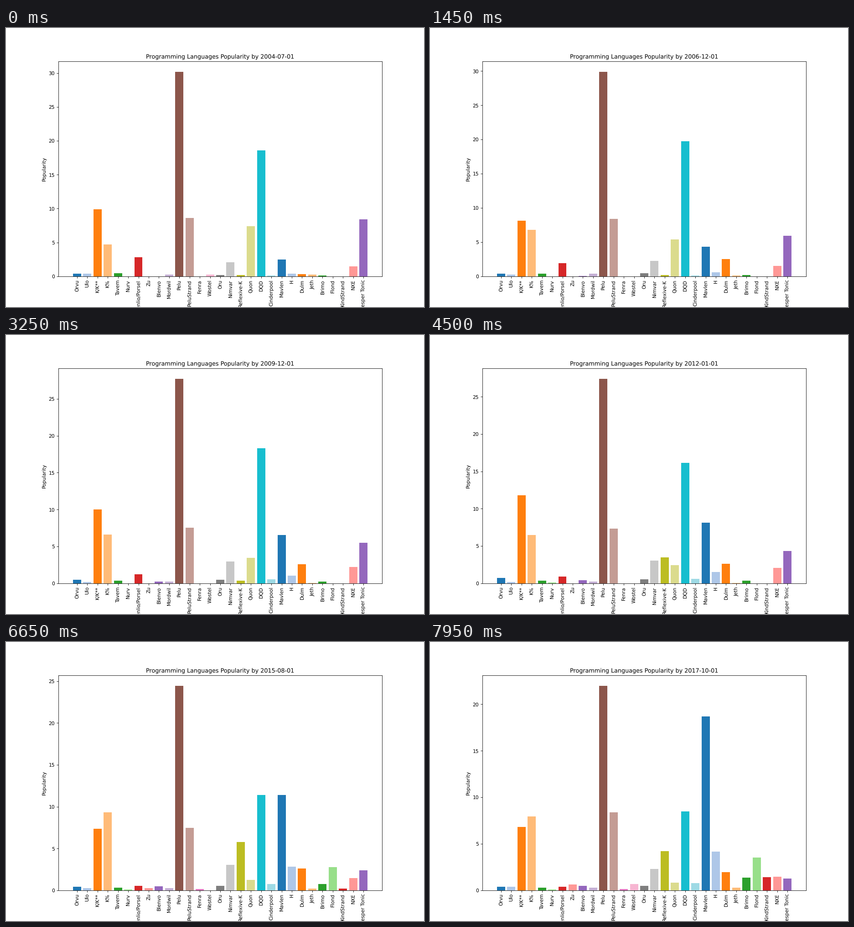
A matplotlib script for the animation above (8000 ms loop, 917 by 611 pixels).

```python
import numpy as np
import matplotlib.pyplot as plt
from matplotlib.animation import FuncAnimation
from matplotlib.ticker import MultipleLocator

WIDTH, HEIGHT, DPI = 917, 611, 76.4
FRAMES, INTERVAL = 160, 50
FIRST_MONTH = 2004 * 12 + 6

plt.rcParams["font.family"] = "DejaVu Sans"
plt.rcParams["text.hinting"] = "none"

# Years since the first month, one step per frame.
t = np.arange(FRAMES) / 12


def rise(mid, span):
    """Smooth step from 0 to 1 around the year mid."""
    return 1 / (1 + np.exp((mid - t) / span))


def bump(mid, span):
    """Bell of height 1 around the year mid."""
    return np.exp(-(((t - mid) / span) ** 2))


def decay(span):
    return np.exp(-t / span)


SERIES = {
    "Orvu": 0.4 + 0.33 * bump(8, 2.2),
    "Ulo": 0.19 + 0.004 * (t - 6.5) ** 2,
    "K/K**": 10 - 0.24 * t - 1.3 * bump(2.4, 1.5) + 4 * bump(7, 1.5),
    "K%": 4.55 - 0.1 * t + 2.6 * rise(1.2, 0.4) + 3.4 * rise(8.4, 0.25) - 1.5 * rise(12.3, 0.5),
    "Tavem": 0.45 - 0.013 * t,
    "Nurv": 0.09 * (t >= 7.25),
    "Benlio/Porsel": 2.8 * decay(6.5),
    "Zu": 0.0013 * np.clip(t - 5.4, 0, None) ** 3,
    "Blenvo": 0.5 * rise(5.5, 1.3),
    "Mordwil": 0.26 + 0.1 * bump(2.4, 1.2),
    "Pelu": 30.2 - 0.0467 * t**2 - 1.1 * bump(5.4, 1.5),
    "PeluStrand": 8.6 - 1.3 * rise(4, 0.9) + 1.3 * rise(12.3, 0.6),
    "Fenra": 0.16 * rise(9.2, 0.6),
    "Wostel": 0.26 * decay(0.5) + 0.7 * rise(12.7, 0.15),
    "Oru": 0.15 + 0.33 * rise(1.5, 0.4) + 0.12 * bump(9.3, 1.5),
    "Nimvar": 2.1 + 0.95 * rise(3.6, 0.7) - 1.1 * rise(12.9, 0.5),
    "Reflexive-K": 0.17 + 6.1 * rise(7.4, 0.55) - 2.4 * rise(12, 0.7),
    "Quon": 7.4 * decay(8.2) * bump(0, 17),
    "DQD": 19.8 * bump(2, 12.2) - 0.7 * decay(1),
    "Cinderpool": 0.1 + 0.5 * rise(4.3, 0.5) + 0.2 * rise(10.2, 0.5),
    "Mavlen": 2.5 + 0.75 * t + 7.2 * rise(12.3, 0.5),
    "H": 0.4 * np.exp(0.177 * t),
    "Dulm": 0.3 + 2.3 * rise(1.4, 0.3) - 0.8 * rise(12.7, 0.4),
    "Jeth": 0.06 + 0.2 * decay(1.7) + 0.25 * rise(11, 0.6),
    "Brimo": 0.13 + 0.02 * np.exp(0.31 * t),
    "Flond": (2.33 + 0.36 * (t - 9.9)) * (t >= 9.9),
    "KindStrand": 1.8 * rise(12.4, 0.65),
    "NXE": 1.45 + 0.85 * bump(6.2, 2.2),
    "Vesper Tonic": 8.4 - 0.54 * t - 1.2 * bump(2.4, 1.2),
}
DATA = np.array(list(SERIES.values()))
COUNT = len(DATA)

# The small excess keeps the pixel size from being truncated by one.
fig, ax = plt.subplots(
    figsize=((WIDTH + 0.01) / DPI, (HEIGHT + 0.01) / DPI), dpi=DPI, facecolor="white"
)
palette = plt.get_cmap("tab20").colors
colors = [palette[i % len(palette)] for i in range(COUNT)]
bars = ax.bar(range(COUNT), DATA[:, 0], width=0.8, color=colors)

ax.set_xticks(range(COUNT), list(SERIES), rotation=90)
ax.yaxis.set_major_locator(MultipleLocator(5))
ax.set_ylabel("Popularity")
title = ax.set_title("")


def update(n):
    year, month = divmod(FIRST_MONTH + n, 12)
    values = DATA[:, n]
    for bar, value in zip(bars, values):
        bar.set_height(value)
    ax.set_ylim(0, values.max() * 1.05)
    title.set_text(f"Programming Languages Popularity by {year}-{month + 1:02d}-01")
    return [*bars, title]


anim = FuncAnimation(
    fig, update, frames=FRAMES, init_func=lambda: update(0),
    interval=INTERVAL, repeat=True, repeat_delay=0, blit=False,
)
plt.show()
```
